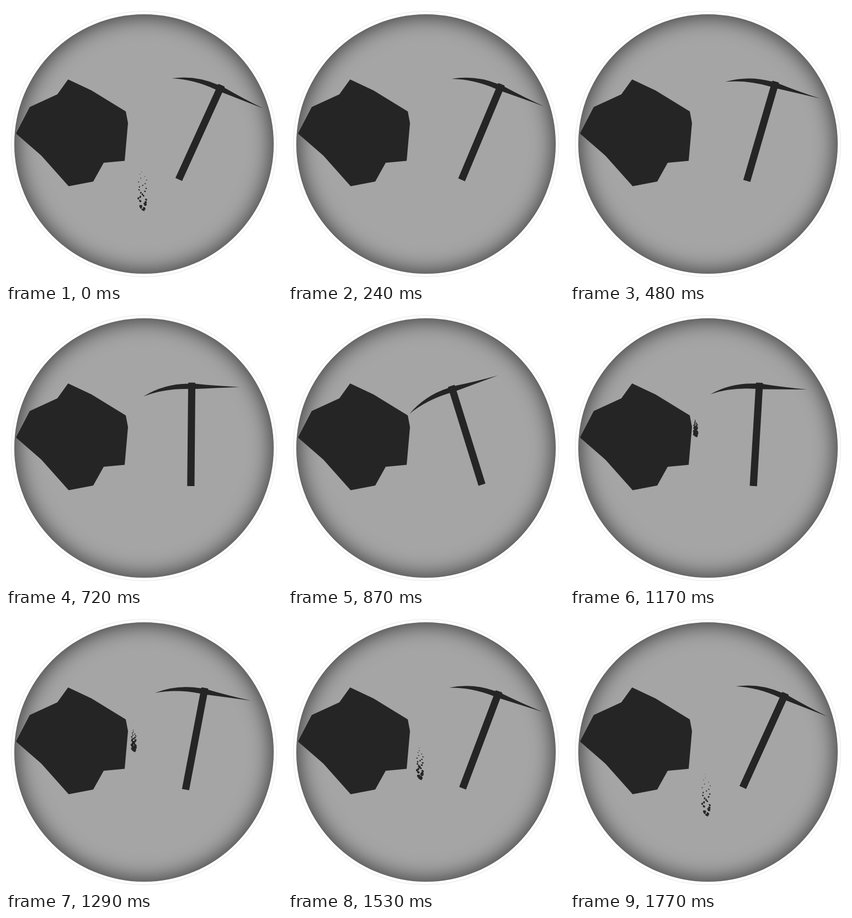
An HTML page that plays this animation: 500x500 px, repeating every 1800 ms.

```html
<!DOCTYPE html>
<html lang="en">
<head>
<meta charset="utf-8">
<title>Pickaxe and rock</title>
<style>
  html, body { margin: 0; width: 100%; height: 100%; overflow: hidden; background: #fff; }
  #stage { position: relative; width: 500px; height: 500px; overflow: hidden; }
  #disc {
    position: absolute; left: 15px; top: 15px; width: 470px; height: 470px;
    border-radius: 50%; background: #a5a5a5; box-shadow: inset 0 0 40px rgba(0, 0, 0, .75);
  }
  svg { position: absolute; left: 0; top: 0; }
</style>
</head>
<body>
<div id="stage">
  <div id="disc"></div>
  <svg width="500" height="500" viewBox="0 0 500 500" fill="#252525">
    <circle cx="250" cy="250" r="240.5" fill="none" stroke="#ccc" stroke-width=".5"/>
    <path d="M112.500 133L155 153L217 191L221 212L215 280.500L177 284L158 318L113.500 326.500L64 271L18 231L43 183L93 160Z"/>
    <path id="debris"/>
    <g id="pick">
      <path d="M248.500 157Q285 134 329 133.500H342Q380 137.500 422.500 139Q380 141 342 143H329Q285 142.500 248.500 157Z"/>
      <path d="M329.500 133Q329.500 131.500 331 131.500H341Q342.500 131.500 342.500 133L341.700 319H328.500Z"/>
    </g>
  </svg>
</div>
<script>
const LOOP = 1800, STEP = 30, HIT = 900, GONE = 170;
const REST = 24.2, SWING = 46.3;
const CHIPS = 27;
const pick = document.getElementById('pick');
const debris = document.getElementById('debris');

let seed = 11;
function random() {
  seed = (seed * 16807) % 2147483647;
  return seed / 2147483647;
}
for (let i = 0; i < 5; i++) random();

// Offsets from the lowest chip: fine dust on top, larger lumps below
const chips = Array.from({ length: CHIPS }, (_, i) => {
  const u = i / (CHIPS - 1);
  const x = -9 + 20 * random() ** 1.5;
  return {
    x: x * (1 - u ** 8),
    y: -74 * (1 - u ** 0.75),
    size: 0.8 + 4.8 * u ** 0.9,
    turn: random() * 6
  };
});

// Slow wind-up into the blow, then a decelerating lift back
function angleAt(t) {
  if (t < HIT) {
    const x = t / HIT;
    return REST - SWING * x * x * (0.52 - 0.12 * x + 0.6 * x * x);
  }
  const u = (LOOP - t) / (LOOP - HIT);
  return REST - SWING * u * u * (0.92 + 0.08 * u ** 6);
}

function chipPath(x, y, size, turn) {
  let path = '';
  for (let k = 0; k < 6; k++) {
    const a = k * Math.PI / 3 + turn;
    const r = size / 2 * (1 + 0.3 * Math.sin(turn * 7.3 + k * 2.4));
    path += (k ? 'L' : 'M') + (x + r * Math.cos(a)).toFixed(2) + ' ' + (y + r * Math.sin(a)).toFixed(2);
  }
  return path + 'Z';
}

// Chips fly off the rock, spread out and carry on falling into the next loop
function debrisAt(t) {
  if (t > GONE && t < HIT) return '';
  const dt = (t < HIT ? t + LOOP - 14 : t) - 1770;
  const q = dt / 240, spread = 1 + dt / 950;
  const ax = 248 + 8 * q, ay = 364 + 73.5 * q + 7.5 * q * q;
  return chips.map(c => chipPath(
    ax + c.x * spread, ay + c.y * spread, Math.max(0, c.size - dt * 0.002), c.turn
  )).join('');
}

function draw(now) {
  const t = Math.floor(now % LOOP / STEP) * STEP;
  pick.setAttribute('transform', `rotate(${angleAt(t).toFixed(3)} 335.2 265)`);
  debris.setAttribute('d', debrisAt(t));
}

const start = performance.now();
function tick() {
  draw(performance.now() - start);
  requestAnimationFrame(tick);
}
tick();
</script>
</body>
</html>
```
